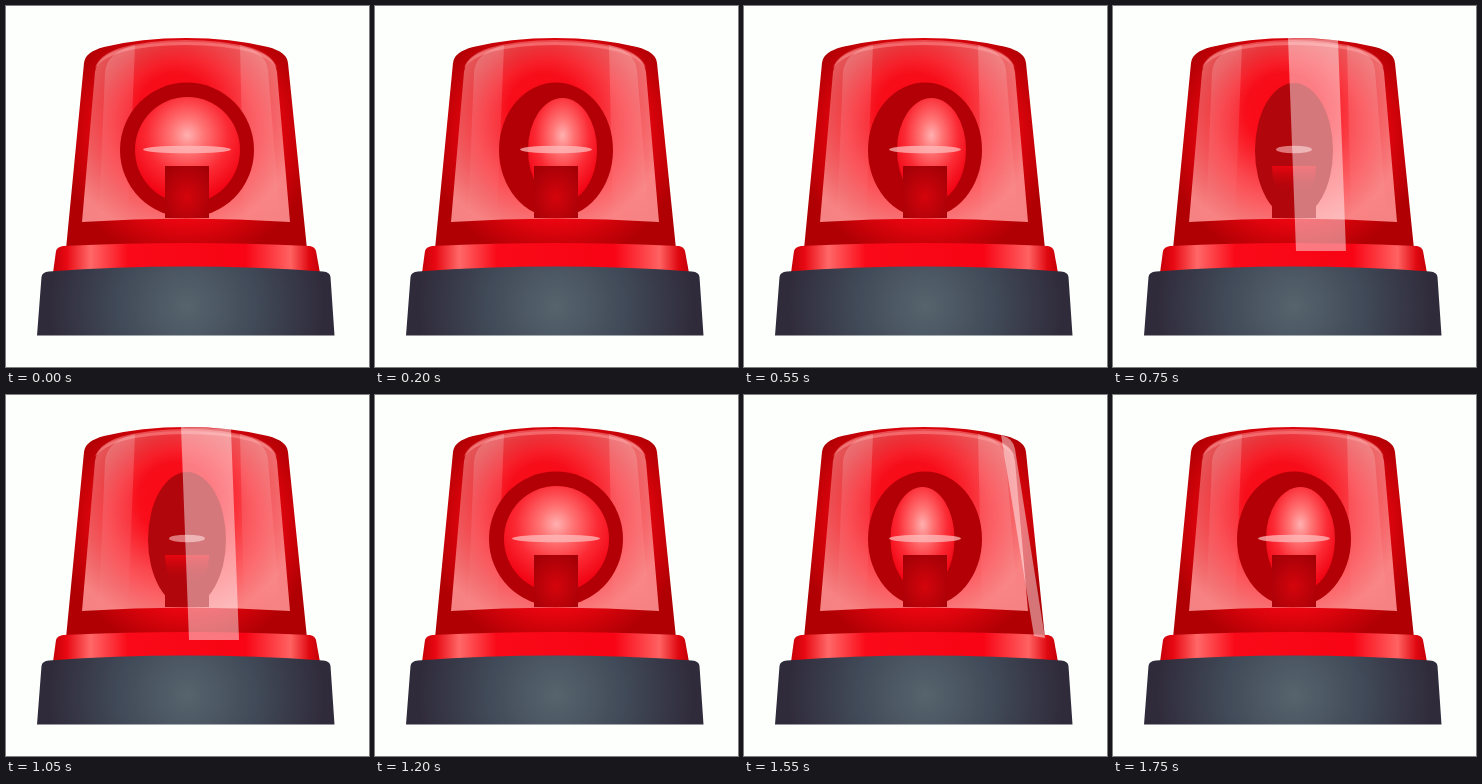
Recreate the animation shown at these times as an HTML page. Size 363 by 361 pixels, loop 1800 ms.

```html
<!DOCTYPE html>
<html>
<head>
<meta charset="utf-8">
<style>
html, body { margin: 0; width: 100%; height: 100%; overflow: hidden; background: #fdfffc; }
svg { display: block; width: 363px; height: 361px; }
</style>
</head>
<body>
<svg viewBox="0 0 363 361">
  <defs>
    <radialGradient id="glow" gradientUnits="userSpaceOnUse" cx="181" cy="130" r="128">
      <stop offset="0" stop-color="#ff0816"/>
      <stop offset=".6" stop-color="#f50612"/>
      <stop offset=".85" stop-color="#c80208"/>
      <stop offset="1" stop-color="#b00004"/>
    </radialGradient>
    <radialGradient id="glass" gradientUnits="userSpaceOnUse" cx="170" cy="105" r="125">
      <stop offset="0" stop-color="#ff9494" stop-opacity="0"/>
      <stop offset=".3" stop-color="#ff9494" stop-opacity=".05"/>
      <stop offset=".6" stop-color="#ff9494" stop-opacity=".45"/>
      <stop offset="1" stop-color="#ff9494" stop-opacity=".88"/>
    </radialGradient>
    <linearGradient id="pane" x2="0" y2="1">
      <stop offset="0" stop-color="#fff" stop-opacity=".2"/>
      <stop offset="1" stop-color="#fff" stop-opacity="0"/>
    </linearGradient>
    <linearGradient id="rim">
      <stop offset="0" stop-color="#c60008"/>
      <stop offset=".05" stop-color="#e80812"/>
      <stop offset=".14" stop-color="#ff6868"/>
      <stop offset=".28" stop-color="#fa0a18"/>
      <stop offset=".72" stop-color="#f80414"/>
      <stop offset=".89" stop-color="#ff6262"/>
      <stop offset=".96" stop-color="#e00810"/>
      <stop offset="1" stop-color="#c40008"/>
    </linearGradient>
    <radialGradient id="base" gradientUnits="userSpaceOnUse" cx="181" cy="300" r="138">
      <stop offset="0" stop-color="#56646d"/>
      <stop offset=".5" stop-color="#414a58"/>
      <stop offset="1" stop-color="#302b3b"/>
    </radialGradient>
    <radialGradient id="lamp" cx=".5" cy=".36" r=".6">
      <stop offset="0" stop-color="#ffb0b0"/>
      <stop offset=".25" stop-color="#ff7777"/>
      <stop offset=".65" stop-color="#fb2a34"/>
      <stop offset="1" stop-color="#f20514"/>
    </radialGradient>
    <radialGradient id="post" cx=".5" cy=".6" r=".75">
      <stop offset="0" stop-color="#d4040c"/>
      <stop offset="1" stop-color="#a00006"/>
    </radialGradient>
    <linearGradient id="backGlow" x2="0" y2="1">
      <stop offset="0" stop-color="#e80610"/>
      <stop offset="1" stop-color="#b4040a" stop-opacity="0"/>
    </linearGradient>
  </defs>

  <path fill="url(#glow)" d="M60 243L78 57Q79 46 98 41Q135 32 180 32Q225 32 262 41Q281 46 282 57L301 243Z"/>
  <path fill="url(#glass)" d="M76 216L89 66Q91 51 112 44Q140 36 180 36Q220 36 248 44Q269 51 271 66L284 216Q180 209 76 216Z"/>
  <path fill="#ff9494" opacity=".5" d="M89 62Q93 49 114 42Q143 34 180 34Q217 34 246 42Q267 49 271 62Q264 52 244 46Q217 39 180 39Q143 39 116 46Q96 52 89 62Z"/>
  <path fill="url(#pane)" d="M93 212L99 66Q101 46 129 39L122 212Z"/>
  <path fill="url(#pane)" d="M234 39Q260 45 262 65L274 212H238Z"/>

  <g id="front">
    <ellipse id="ring" cy="144" ry="67.5" fill="#b30006"/>
    <ellipse id="disc" cy="144" fill="url(#lamp)"/>
    <path d="M159 160H203V212H159Z" fill="url(#post)"/>
  </g>
  <g id="back">
    <ellipse cx="181" cy="144.5" rx="39" ry="67.5" fill="#b0060c"/>
    <path d="M159 190H203V212H159Z" fill="#b0060c"/>
    <path d="M159 160H203Q203 178 194 188H168Q159 178 159 160Z" fill="url(#backGlow)"/>
  </g>
  <ellipse id="shine" cx="181" cy="143.5" ry="3.8" fill="#ffc0c0"/>

  <path fill="url(#rim)" d="M47 267L50 245Q51 241 57 240Q120 237 180 237Q241 237 304 240Q309 241 310 245L314 267Z"/>
  <path id="strip" fill="#fff"/>
  <path fill="url(#base)" d="M31 329.5L35.500 271Q36 266 43 265.500Q110 260.500 180 260.500Q250 260.500 317 265.500Q324 266 324.500 271L328.500 329.500Z"/>
</svg>
<script>
const el = id => document.getElementById(id);
const set = (id, attrs) => {
  for (const k in attrs) el(id).setAttribute(k, attrs[k]);
};

const edgeStrip = "M257 40Q269 43 271 54L301 243L290 241Z";
const midStrip = "M175 32L225 34L233 245H183Z";

const facing = { ring: 67, x: 181.5, rx: 52.5, ry: 53, shine: 44 };
const left = { ring: 57, x: 178.5, rx: 32, ry: 52, shine: 36, strip: edgeStrip };
const away = { shine: 18, strip: midStrip };
const right = { ring: 57, x: 187.5, rx: 34.5, ry: 52, shine: 36 };
const turn = [facing, left, left, away, right, right];

function draw(now) {
  const pose = turn[Math.floor(now % 1800 / 50) % turn.length];
  const isAway = pose === away;
  set("front", { visibility: isAway ? "hidden" : "visible" });
  set("back", { visibility: isAway ? "visible" : "hidden" });
  if (!isAway) {
    set("ring", { cx: 181, rx: pose.ring });
    set("disc", { cx: pose.x, rx: pose.rx, ry: pose.ry });
  }
  set("shine", { rx: pose.shine, opacity: isAway ? .6 : .72 });
  set("strip", { d: pose.strip || "", opacity: .46 });
  requestAnimationFrame(draw);
}
draw(performance.now());
</script>
</body>
</html>
```
